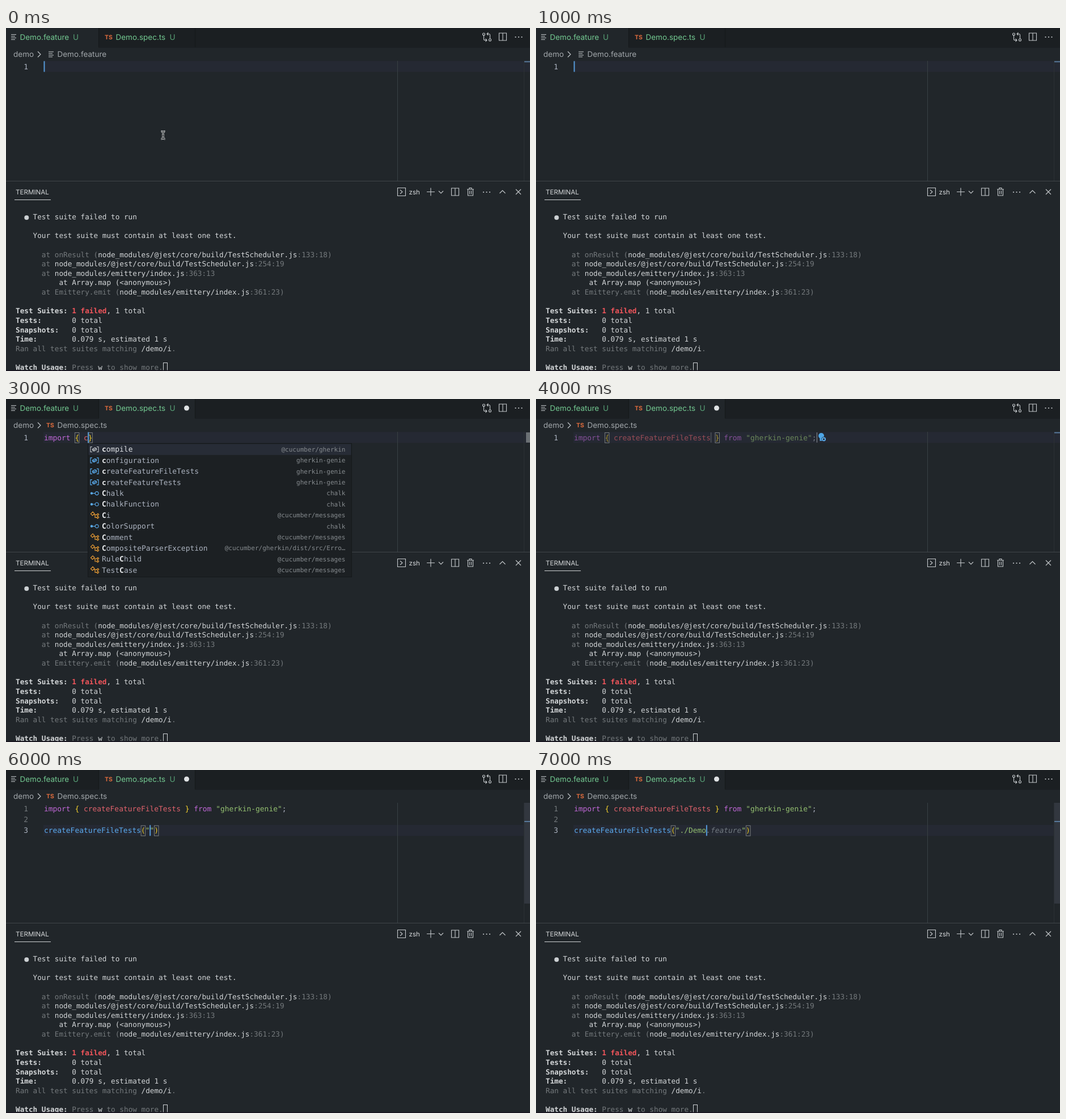
These frames come from a looping animation (924x606 px, 8 s). An HTML page:

```html
<!DOCTYPE html>
<html lang="en">
<head>
<meta charset="utf-8">
<style>
  html, body { margin: 0; width: 100%; height: 100%; overflow: hidden; background: #21262a; }
  svg { display: block; width: 924px; height: 606px; }
  text { white-space: pre; text-rendering: geometricPrecision; fill: #ccd0d3; }
  .code { font: 12.92px "DejaVu Sans Mono", monospace; fill: #abb2bf; }
  .term { font: 12.7px "DejaVu Sans Mono", monospace; fill: #d3d6d8; }
  .origin { font: 11.05px "DejaVu Sans Mono", monospace; fill: #858a8e; }
  .ui { font: 13.5px Inter, sans-serif; fill: #a2a7ab; }
  .small { font: 11.6px Inter, sans-serif; fill: #d5d8da; }
  .green { fill: #73c991; }
  .badge { fill: #58a277; }
  .ts { font: bold 10.5px Inter, sans-serif; fill: #dc6b3d; }
  .dim { fill: #74797c; }
  .bold, .match { font-weight: bold; }
  .match { fill: #eceef0; }
  .fail { font-weight: bold; fill: #f1555b; }
  .kw { fill: #c168d8; }
  .brace { fill: #f3d02c; }
  .name { fill: #e0626c; }
  .str { fill: #93bf70; }
  .fn { fill: #5babf0; }
  .ghost { fill: #717980; font-style: italic; }
  .gone { fill: #858a8e; text-decoration: line-through; }
  .line { fill: none; stroke: #c5c9cc; stroke-width: 1.1; }
  .blue { fill: none; stroke: #5aa9ea; stroke-width: 1.2; }
  .orange { fill: none; stroke: #e59a35; stroke-width: 1.2; }
  .purple { fill: none; stroke: #b180d7; stroke-width: 1.2; }
</style>
</head>
<body>
<svg id="stage" viewBox="0 0 924 606"></svg>
<script>
const STEP = 1000, STEPS = 8, CHAR = 7.78, ROW = 19.4;
const col = n => 67 + n * CHAR;
const row = n => 68 + n * ROW;

// [class:text] colours a run, *text* marks a completion match
const text = (cls, x, y, str, extra = '') => `<text class="${cls}" x="${x}" y="${y}" ${extra}>` +
  str.replace(/</g, '&lt;')
    .replace(/\[(\w+):(.*?)\]/g, '<tspan class="$1">$2</tspan>')
    .replace(/\*(.*?)\*/g, '<tspan class="match">$1</tspan>') + '</text>';
const right = (cls, x, y, str) => text(cls, x, y, str, 'text-anchor="end"');
const rect = (x, y, w, h, fill, extra = '') =>
  `<rect x="${x}" y="${y}" width="${w}" height="${h}" fill="${fill}" ${extra}/>`;
const path = (d, cls = 'line', extra = '') => `<path class="${cls}" d="${d}" ${extra}/>`;
const dot = (x, y, r, fill) => `<circle cx="${x}" cy="${y}" r="${r}" fill="${fill}"/>`;
const at = (x, y, body) => `<g transform="translate(${x} ${y})">${body}</g>`;
const during = (steps, ...body) => `<g data-steps="${steps}">${body.join('')}</g>`;

const code = (r, str, extra) => text('code', 67, row(r) + 4.5, str, extra);
const lineNo = (r, active) => right(active ? 'code' : 'code dim', 39, row(r) + 4.5, `${r + 1}`);
const caret = (c, r) => rect(col(c) - .5, row(r) - 9.5, 2, 19, '#559ad8');
const bracket = (c, r) => rect(col(c), row(r) - 8.5, 7.5, 18, 'none', 'stroke="#777c7e"');
const highlight = r => rect(66, row(r) - 9.7, 858, ROW, '#252933');

const fileIcon = (x, y) => at(x, y, path('M0 0h9M0 3h7M0 6h9M0 9h7'));
const splitIcon = (x, y) => at(x, y, path('M-6.5-6.5h13v13h-13zM0-6.5v13'));
const moreIcon = (x, y) => [-5.5, 0, 5.5].map(d => dot(x + d, y, 1.1, '#c5c9cc')).join('');
const cross = (x, y, s) => at(x, y, path(`M${-s}${-s}L${s} ${s}M${s}${-s}L${-s} ${s}`));

const kinds = {
  variable: cls => path('M-4-4.5h-3v9h3M4-4.5h3v9h-3M-3.5-.5L1-3 3.5-1.5V1L-1 3.2-3.5 1.8zM-3.5-.5L-1 .8 3.5-1.5M-1 .8v2', cls),
  interface: () => dot(-5, 0, 2.2, '#5aa9ea') + path('M-4 0h5M7.2 0a3 3 0 1 1-6 0a3 3 0 1 1 6 0', 'blue'),
  class: () => path('M-6.5-2.5l3.5-3.5 3 3-3.5 3.5zM-1-1h5M1-1v5h3M4-1l2-2 1.7 1.7-2 2zM4 4l2-2 1.7 1.7-2 2z', 'orange'),
  method: () => path('M0-6.5L6-3.5V3.5L0 6.5-6 3.5V-3.5zM-6-3.5L0-.5 6-3.5M0-.5v7', 'purple')
};

function completions(x, y, width, items) {
  return items.map(([kind, label, origin], i) => {
    const mid = y + 10 + i * ROW;
    return (i ? '' : rect(x + 1, y + 1, width - 2, ROW, '#272c36')) +
      at(x + 11.5, mid + .5, kinds[kind](i ? 'blue' : 'line')) +
      text('code', x + 24.5, mid + 4.8, label, i ? '' : 'style="fill:#dfe2e5"') +
      (origin ? right('origin', x + width - 11, mid + 4.3, origin) : '');
  }).join('');
}
const box = (x, y, w, h) => rect(x + .5, y + .5, w, h, '#1c2023', 'stroke="#15191b"');

const activeTab = (x, w) => rect(x, 0, w, 35, '#21262a');
const editorFrame = [
  path('M690.5 58V270', 'line', 'style="stroke:#393f43"'),
  path('M913.5 58V270', 'line', 'style="stroke:#2c3135"'),
  path('M163.5 0V34M333.5 0V34', 'line', 'style="stroke:#15191b"'),
  fileIcon(9, 11.5), text('ui green', 24.5, 20.8, 'Demo.feature'), text('ui badge', 118, 20.8, 'U'),
  text('ts', 174, 20, 'TS'), text('ui green', 193.5, 20.8, 'Demo.spec.ts'), text('ui badge', 288.5, 20.8, 'U'),
  text('ui', 13, 51, 'demo'), path('M56 41.5l5 5-5 5'),
  at(848, 16, path('M-5.5-3v6.5q0 2 2 2H0M-2.5 3L0 5.5-2.5 8M5.5 3v-6.5q0-2-2-2H0M2.5-8L0-5.5 2.5-3') +
    path('M-3.5-5a2 2 0 1 1-4 0a2 2 0 1 1 4 0M7.5 5a2 2 0 1 1-4 0a2 2 0 1 1 4 0')),
  splitIcon(876, 15.5), moreIcon(904, 16)
].join('');

const log = [
  '    Test suite failed to run', '',
  '    Your test suite must contain at least one test.', '',
  '[dim:      at onResult (]node_modules/@jest/core/build/TestScheduler.js[dim::133:18)]',
  '[dim:      at ]node_modules/@jest/core/build/TestScheduler.js[dim::254:19]',
  '[dim:      at ]node_modules/emittery/index.js[dim::363:13]',
  '          at Array.map (<anonymous>)',
  '[dim:      at Emittery.emit (]node_modules/emittery/index.js[dim::361:23)]', '',
  '[bold:Test Suites: ][fail:1 failed], 1 total',
  '[bold:Tests:]       0 total',
  '[bold:Snapshots:]   0 total',
  '[bold:Time:]        0.079 s, estimated 1 s',
  '[dim:Ran all test suites matching ]/demo/i[dim:.]', '',
  '[bold:Watch Usage:][dim: Press ]w[dim: to show more.]'
];
const terminal = [
  rect(0, 270, 924, 1, '#40464a'),
  text('small', 17, 294, 'TERMINAL'), rect(15, 303, 64, 1, '#d0d3d5'),
  path('M690.5 282.5h14v14h-14zM695 286l4 3.5-4 3.5'), text('small', 710.5, 294, 'zsh'),
  path('M742 289.5h14M749 282.5v14M763 288l4 4 4-4'),
  splitIcon(792, 289.5),
  path('M813 285h12M817 285v-2.5h4v2.5M814.5 285v11h9v-11M817.5 287.5v6M820.5 287.5v6'),
  moreIcon(847.5, 290), path('M870.5 292l5-5 5 5'), cross(903.5, 289.5, 4.5),
  dot(36.3, 335, 4, '#ccd0d3'),
  ...log.map((str, i) => text('term', 17, 338 + i * 16.63, str)),
  rect(277.5, 591.5, 7, 16, 'none', 'stroke="#ccd0d3"'),
  rect(0, 604.5, 924, 1.5, '#191520')
].join('');

const importLine = '[kw:import] [brace:{] [name:createFeatureFileTests] [brace:}] [kw:from] [str:"gherkin-genie"];';
const rulerMark = y => rect(914, y, 10, 2, '#587a9c');

const importList = [
  ['variable', '*c*ompile', '@cucumber/gherkin'],
  ['variable', '*c*onfiguration', 'gherkin-genie'],
  ['variable', '*c*reateFeatureFileTests', 'gherkin-genie'],
  ['variable', '*c*reateFeatureTests', 'gherkin-genie'],
  ['interface', '*C*halk', 'chalk'],
  ['interface', '*C*halkFunction', 'chalk'],
  ['class', '*C*i', '@cucumber/messages'],
  ['interface', '*C*olorSupport', 'chalk'],
  ['class', '*C*omment', '@cucumber/messages'],
  ['class', '*C*ompositeParserException', '@cucumber/gherkin/dist/src/Erro…'],
  ['class', 'Rule*C*hild', '@cucumber/messages'],
  ['class', 'Test*C*ase', '@cucumber/messages']
];
const callList = [
  ['variable', '*creat*eFeatureFileTests'],
  ['method', '*creat*eImageBitmap'],
  ['method', '*creat*eFeatureTests', 'gherkin-genie'],
  ['variable', '*Cre*den*t*i*a*l'],
  ['variable', '*Cre*dentialsCon*ta*iner'],
  ['variable', '*C*haract*er*D*at*a'],
  ['variable', '*C*SSLay*er*St*at*ementRule'],
  ['method', '*c*lea*r*Imm*e*di*at*e'],
  ['variable', '*C*anvasCaptureMediaSt*rea*m*T*rack'],
  ['variable', '*C*SSStyl*e*Decla*rat*ion'],
  ['variable', '*C*ountQu*e*uingSt*rat*egy'],
  ['variable', '[gone:clientInformation]']
];
const details = [
  '(alias) function createFeatureFileTests(featurePath: st',
  'ring, stepDefinitionClasses?: Array<import("./StepDefin',
  'itions").StepDefinitionsClasses>): void import createFe',
  'atureFileTests'
];

const iBeam = 'M-3.5-6.5q3 0 3.5 1.5q.5-1.5 3.5-1.5M0-5V5.5M-3.5 7q3 0 3.5-1.5q.5 1.5 3.5 1.5M-2 1h4';
const hand = 'M-2.8-4.5q0-1.3 1.1-1.3t1.1 1.3V-1q.3-1 1.3-.7t.8 1.2q.5-.8 1.3-.4t.7 1.2q1.2-.6 1.5.6V4q-.3 1.5-1 2.5V8H-1.6V6.8Q-3.5 4.5-5 1.8q-.3-1 .6-1.2T-2.8 2z';

document.getElementById('stage').innerHTML = [
  rect(0, 0, 924, 606, '#21262a'),
  rect(0, 0, 924, 35, '#1b1f22'),
  during('01', activeTab(0, 163), fileIcon(75, 42), text('ui', 90.5, 51, 'Demo.feature')),
  during('234567', activeTab(164, 169), text('ts', 71, 50, 'TS'), text('ui', 90.5, 51, 'Demo.spec.ts')),
  during('01234', highlight(0), lineNo(0, true)),
  during('567', highlight(2), lineNo(0), lineNo(1), lineNo(2, true)),
  during('567', rect(914, 58, 10, 178, '#32373f'), rulerMark(90)),
  during('014', rulerMark(58.5)),
  editorFrame,
  terminal,

  during('012', caret(0, 0)),
  during('0', at(277, 189, path(iBeam, 'line', 'style="stroke:#e8eaeb;stroke-width:3"') +
    path(iBeam, 'line', 'style="stroke:#16191b;stroke-width:1.2"'))),
  during('2', cross(318.5, 16, 4.5),
    at(258.5, 21.5, path(hand, '', 'fill="#fff" stroke="#16191b" stroke-width="1"') +
      path('M-.2 3v3M1.7 3v3M3.5 3v3', 'line', 'style="stroke:#333;stroke-width:.7"'))),
  during('34567', dot(318.5, 16, 4.5, '#dfe2e4')),

  during('3', bracket(7, 0), bracket(10, 0), code(0, '[kw:import] [brace:{] [name:c][brace:}]'), caret(10, 0),
    rect(917, 59, 7, 18, '#6b7074'),
    box(144, 78, 465, 236), completions(144.5, 78.5, 465, importList)),

  during('4', bracket(7, 0), bracket(32, 0), code(0, importLine, 'opacity=".62"'),
    rect(col(31), 59, 1, 18, '#62676a'), rect(col(55), 59, 1, 18, '#8d9397'),
    dot(503, 65, 5, '#4ea6e6'), rect(500.5, 69, 4, 5, '#4ea6e6'),
    dot(507.5, 71, 4.2, '#21262a'), '<circle class="blue" cx="507.5" cy="71" r="2.6" style="stroke-width:2"/>'),

  during('567', code(0, importLine)),
  during('5', code(2, 'creat[ghost:eFeatureFileTests("demo", __dirname);]'), caret(5, 2),
    box(105, 117, 466, 333),
    completions(105.5, 117, 465, callList),
    rect(559, 118, 11, 178, '#343a42'),
    rect(106, 352, 465, 1, '#33393d'),
    ...details.map((str, i) => text('code', 112, 372.3 + i * 19.5, str, 'style="fill:#858a8e"')),
    cross(558.5, 368, 4)),
  during('6', bracket(22, 2), bracket(25, 2),
    code(2, '[fn:createFeatureFileTests][brace:(][str:""][brace:)]'), caret(24, 2)),
  during('7', bracket(22, 2), bracket(39, 2),
    code(2, '[fn:createFeatureFileTests][brace:(][str:"./Demo][ghost:.feature][str:"][brace:)]'), caret(30, 2))
].join('');

const groups = document.querySelectorAll('[data-steps]');
function frame(now) {
  const step = Math.floor(now / STEP) % STEPS;
  for (const g of groups) g.style.display = g.dataset.steps.includes(step) ? '' : 'none';
  requestAnimationFrame(frame);
}
frame(performance.now());
</script>
</body>
</html>
```
